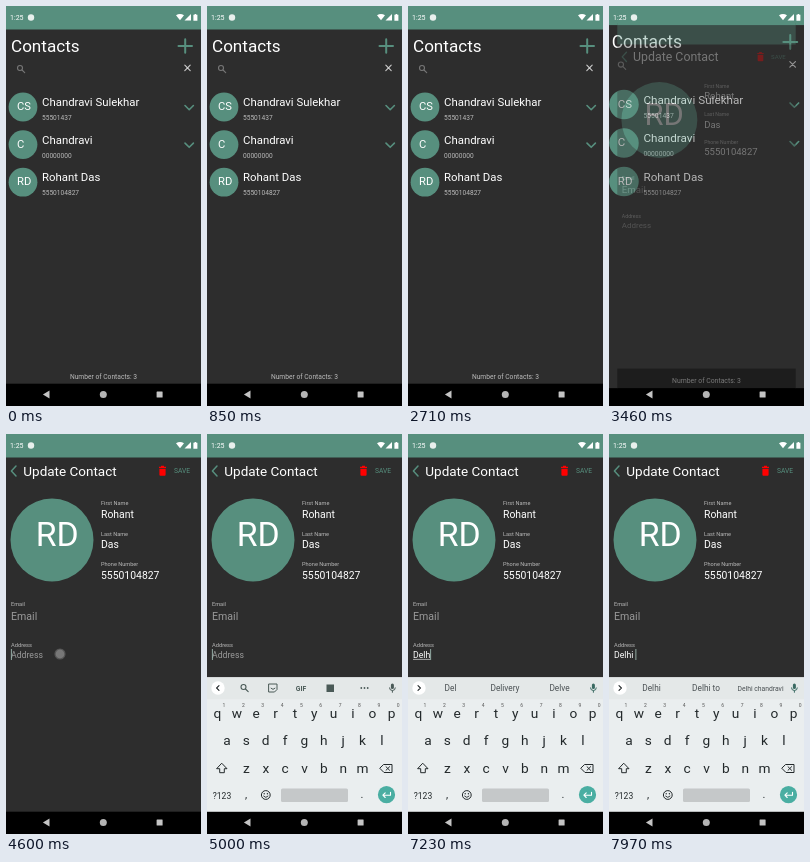
These frames come from a looping animation (195x400 px, 8 s). An HTML page:

```html
<!DOCTYPE html>
<html lang="en">
<head>
<meta charset="utf-8">
<title>Contacts</title>
<style>
html, body { margin: 0; width: 100%; height: 100%; overflow: hidden; background: #000; }
svg { display: block; }
#stage { width: 100vw; height: 100vh; font-family: Roboto, Arial, sans-serif; }
text { white-space: pre; }
.line { fill: none; stroke-width: 1.1; stroke-linecap: round; stroke-linejoin: round; }
</style>
</head>
<body>
<svg id="stage" viewBox="0 0 195 400" preserveAspectRatio="none">
  <g id="list"></g>
  <g id="update"></g>
  <svg width="195" height="377.7"><g id="keyboard"></g></svg>
  <circle id="touch" cx="54" cy="220" r="5" fill="#777" stroke="#555" stroke-width="1.2"/>
  <g id="system"></g>
</svg>
<script>
const LOOP = 8000, GREEN = '#578f7e', BG = '#2d2d2d', INK = '#23292b', TOOL = '#4a5a57';
const $ = id => document.getElementById(id);

const text = (x, y, size, str, fill = '#fff', anchor = 'start', extra = '') =>
  `<text x="${x}" y="${y}" font-size="${size}" fill="${fill}" text-anchor="${anchor}" ${extra}>${str}</text>`;
const line = (d, color, width = 1.1) =>
  `<path class="line" d="${d}" stroke="${color}" style="stroke-width:${width}"/>`;
const shape = (d, fill) => `<path d="${d}" fill="${fill}"/>`;
const circle = (x, y, r, fill) => `<circle cx="${x}" cy="${y}" r="${r}" fill="${fill}"/>`;
const rect = (x, y, w, h, fill, r = 0) =>
  `<rect x="${x}" y="${y}" width="${w}" height="${h}" rx="${r}" fill="${fill}"/>`;
const ring = (x, y, r, color, width = 1) =>
  `<circle cx="${x}" cy="${y}" r="${r}" fill="none" stroke="${color}" stroke-width="${width}"/>`;
const lens = (x, y, color) =>
  ring(x - 1, y - 1, 2.5, color, 1.1) + line(`M${x + 1} ${y + 1}l2.7 2.7`, color);

const windowBase = rect(0, 0, 195, 400, BG) + rect(0, 0, 195, 23.5, GREEN) + rect(0, 377.7, 195, 23, '#000');

function contactRow([name, phone, initials, expandable], i) {
  const y = 101 + i * 37.6;
  return circle(17, y, 14.4, GREEN) + text(11, y + 3, 11.2, initials) +
    text(36, y - 1, 11.4, name) + text(36, y + 13, 6.6, phone, '#bbb') +
    (expandable ? line(`M179 ${y - 1.5}l4.2 4.2 4.2-4.2`, GREEN, 1.6) : '');
}

$('list').innerHTML = windowBase +
  text(5, 46.3, 17.1, 'Contacts') +
  line('M172.5 40h13.5M179.2 33.2v13.5', GREEN, 2) +
  lens(15, 63, '#777') +
  line('M178.8 59.2l5.4 5.4M184.2 59.2l-5.4 5.4', '#ccc') +
  [['Chandravi Sulekhar', '55501437', 'CS', true],
   ['Chandravi', '00000000', 'C', true],
   ['Rohant Das', '5550104827', 'RD', false]].map(contactRow).join('') +
  text(97.5, 373, 6.7, 'Number of Contacts: 3', '#bbb', 'middle');

const field = (y, label, value) => text(95, y, 5.6, label, '#bbb') + text(95, y + 12.6, 10.4, value);

$('update').innerHTML = windowBase +
  line('M10 32l-4.6 5 4.6 5', GREEN, 1.5) +
  text(17.3, 41.8, 13.5, 'Update Contact') +
  shape('M155 31.7h3v1h2v1.3h-7v-1.3h2zM153.4 34.7h6.2v6q0 1-1 1h-4.2q-1 0-1-1z', '#f00') +
  text(168, 39.2, 6.7, 'SAVE', GREEN) +
  circle(46, 106, 41.5, GREEN) +
  text(29.8, 112, 33.8, 'RD') +
  field(71, 'First Name', 'Rohant') +
  field(101.7, 'Last Name', 'Das') +
  field(132, 'Phone Number', '5550104827') +
  text(5, 172, 5.6, 'Email', '#bbb') + text(5, 185.5, 10.6, 'Email', '#999') +
  text(5, 213, 5.7, 'Address', '#bbb') +
  text(5, 223.7, 8.7, '', '#fff', 'start', 'id="address"') +
  '<path id="underline" stroke="#ddd" stroke-width=".7"/>' +
  '<path id="cursor" stroke="#9db8b0" stroke-width=".9"/>';

// Keyboard
const keyRow = (letters, x, y) =>
  [...letters].map((c, i) => text(x + i * 19.35, y, 13.7, c, INK, 'middle')).join('');
const digits = [...'1234567890'].map((d, i) => text(17 + i * 19.35, 273, 5, d, '#555', 'middle')).join('');

const tools = lens(37.5, 254, TOOL) +
  line('M62 250h8v5.5l-2.5 2.5H62zM64 254.3q2 2.4 4 0', TOOL, 1) +
  text(94, 256.6, 6.8, 'GIF', TOOL, 'middle', 'font-weight="700"') +
  rect(119.5, 250.5, 7.5, 7.5, TOOL) +
  [154.3, 157.5, 160.7].map(x => circle(x, 254, .9, TOOL)).join('');

$('keyboard').innerHTML = rect(0, 243.3, 195, 135, '#eaeeef') + rect(0, 243.3, 195, 22, '#e4e8e8') +
  circle(11, 254, 6.7, '#fff') +
  `<path id="arrow" class="line" stroke="${INK}"/>` +
  `<g id="tools">${tools}</g><g id="words"></g>` +
  '<g id="mic">' +
    '<rect x="183.9" y="249.4" width="3" height="5.6" rx="1.5"/>' +
    '<path d="M182.5 253.5q0 3 2.9 3t2.9-3M185.4 256.5v2.2" fill="none" stroke="currentColor"/></g>' +
  digits +
  keyRow('qwertyuiop', 10.5, 283.5) + keyRow('asdfghjkl', 20, 310.5) + keyRow('zxcvbnm', 39.5, 338.5) +
  line('M15 329.5l5 5.2h-2.7v4h-4.6v-4H10z', INK, 1) +
  line('M177 330.5h8v8h-8l-4-4zM179 332.7l3.6 3.6M182.6 332.7l-3.6 3.6', INK, 1) +
  text(15, 364.5, 8.5, '?123', INK, 'middle') +
  text(39, 364, 11, ',', INK, 'middle') +
  ring(58.8, 361, 4.4, INK) + circle(57.2, 359.7, .7, INK) + circle(60.4, 359.7, .7, INK) +
  line('M56.6 362.2q2.2 2.6 4.4 0', INK, .9) +
  rect(74, 354.5, 67, 13.5, '#c5c8c9', 1.5) +
  text(155, 364, 11, '.', INK, 'middle') +
  circle(179.5, 360.7, 8.6, '#4aaea2') +
  line('M183.5 358.2v3h-7.5M178.2 358.9l-2.3 2.3 2.3 2.3', '#fff');

// Status and navigation icons stay put during window transitions
$('system').innerHTML =
  text(4, 14, 7, '1:25') + circle(25, 11.5, 3.2, '#e8f0ed') +
  shape('M170 9.3q4-2.8 8 0l-4 5z', '#fff') +
  shape('M185 8v6.5h-6.5z', '#fff') +
  shape('M187.4 8.8h1.2v-.9h1.6v.9h1.2v5.9h-4z', '#fff') +
  shape('M43.5 384.6v7.8l-6.6-3.9z', '#c4c4c4') + circle(97.3, 388.5, 3.5, '#b4b4b4') +
  rect(150.6, 385.5, 6, 6, '#c4c4c4', .5);

// [time, value] steps; the last one reached holds
const at = (steps, t) => steps.reduce((cur, s) => t >= s[0] ? s : cur)[1];

const OPEN = 3460, FOCUS = 4600;
const enter = [[0, [0, .85, 1]], [OPEN, [.35, .915, 1.025]], [3620, [1, .98, 1.05]], [3740, [1, .995, 1]], [3860, [1, 1, 1]]];
const slide = [[0, 134], [4740, 60], [4870, 0]];
const typed = [[0, ''], [6710, 'D'], [6870, 'De'], [7110, 'Del'], [7230, 'Delh'], [7470, 'Delhi'], [7710, 'Delhi ']];
const hints = [[0, null], [6870, ['De', 'Dear', 'Den']], [7110, ['Del', 'Delivery', 'Delve']],
  [7470, ['Delhi', 'Delhi to', 'Delhi chandravi']]];
const blinkStarts = [FOCUS, 4900, ...typed.slice(1).map(s => s[0])];

const zoom = s => `translate(97.5 200) scale(${s}) translate(-97.5 -200)`;
const show = (id, on) => $(id).setAttribute('visibility', on ? 'inherit' : 'hidden');

let shownWords;
function draw(t) {
  const [alpha, inScale, outScale] = at(enter, t);
  $('list').setAttribute('transform', zoom(outScale));
  $('update').setAttribute('transform', zoom(inScale));
  $('update').setAttribute('opacity', alpha);

  const value = at(typed, t), address = $('address');
  address.textContent = value || 'Address';
  address.setAttribute('fill', value ? '#fff' : '#999');
  const end = 5 + (value ? address.getComputedTextLength() : 0);
  const composing = value && !value.endsWith(' ');
  $('underline').setAttribute('d', `M5 225.4H${end}`);
  show('underline', composing);
  $('cursor').setAttribute('d', `M${end + .4} 215v11`);
  const since = t - Math.max(...blinkStarts.filter(s => s <= t));
  show('cursor', t >= FOCUS && Math.floor(since / 500) % 2 === 0);
  show('touch', t >= FOCUS && t < 4740);

  const dy = at(slide, t), words = at(hints, t);
  $('keyboard').setAttribute('transform', `translate(0 ${dy})`);
  show('keyboard', dy < 134);
  show('tools', !words);
  $('arrow').setAttribute('d', words ? 'M10 251.6l2.4 2.4-2.4 2.4' : 'M12 251.6l-2.4 2.4 2.4 2.4');
  const micColor = words ? '#3a6a62' : TOOL;
  $('mic').setAttribute('style', `color:${micColor};fill:${micColor}`);
  if (words !== shownWords) {
    shownWords = words;
    $('words').innerHTML = (words || []).map((w, i) =>
      text(42.5 + i * 54.5, 257, w.length > 10 ? 6.8 : 8.3, w, '#4a5053', 'middle')).join('');
  }
}

const start = performance.now();
function tick() {
  draw((performance.now() - start) % LOOP);
  requestAnimationFrame(tick);
}
tick();
</script>
</body>
</html>
```
